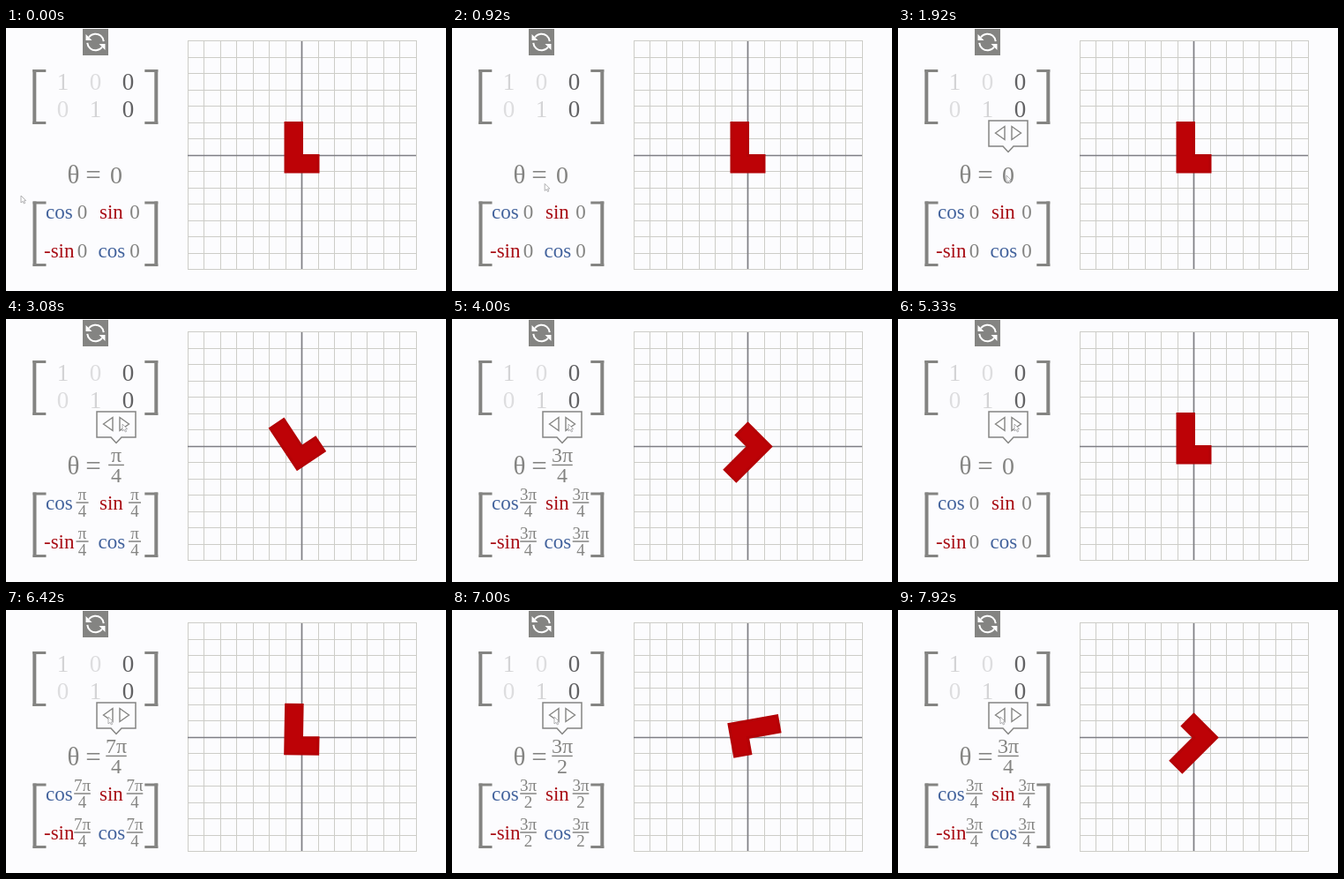
Write an HTML page with a canvas that moves like this. It is 499 px wide and 298 px high and loops after 8 s.

```html
<!DOCTYPE html>
<html lang="en">
<head>
<meta charset="utf-8">
<title>Rotation matrix</title>
<style>
html, body { margin: 0; width: 100%; height: 100%; overflow: hidden; background: #fcfcfe; }
canvas { display: block; }
</style>
</head>
<body>
<canvas id="stage" width="499" height="298"></canvas>
<script>
const ctx = document.getElementById('stage').getContext('2d');
const LOOP = 8000, TURN = 240, CELL = 18.5, CX = 335.5, CY = 144.5;
const PAPER = '#fcfcfe', GREY = '#848482', GRID = '#cdcdc8', AXIS = '#7e7e84';
const BLUE = '#42629c', CRIMSON = '#a80c14';
const SERIF = '"Liberation Serif", serif';

// Each click adds or removes an eighth of a turn.
const forward = [2920, 3270, 3620, 4090, 4335, 4580, 4825, 5070];
const backward = [6400, 6835, 7110, 7390, 7665];
const popupAt = 1670;
const cursorPath = [
  [250, 17, 190], [1000, 108, 176], [1300, 123, 167],
  [1960, 123, 167], [2420, 132, 119], [5400, 132, 119], [5750, 116, 121]
];

const clamp = v => Math.min(1, Math.max(0, v));
const smooth = v => v * v * (3 - 2 * v);

function line(points, color, width, close, fill) {
  ctx.beginPath();
  points.forEach(([x, y]) => ctx.lineTo(x, y));
  if (close) ctx.closePath();
  if (fill) { ctx.fillStyle = fill; ctx.fill(); }
  ctx.strokeStyle = color;
  ctx.lineWidth = width;
  ctx.stroke();
}

function text(str, x, y, size, color, align = 'center') {
  ctx.font = `${size}px ${SERIF}`;
  ctx.textAlign = align;
  ctx.fillStyle = color;
  ctx.fillText(str, x, y);
}

function brackets(left, right, top, bottom) {
  for (const [x, dir] of [[left, 1], [right, -1]]) {
    line([[x + 2 * dir, top], [x + 2 * dir, bottom]], GREY, 4);
    for (const y of [top + 1.5, bottom - 1.5]) line([[x, y], [x + 15 * dir, y]], GREY, 3);
  }
}

// Shows eighths * π/4 in lowest terms.
function angle(eighths, x, baseline, size, fracSize, color) {
  const common = eighths % 4 === 0 ? 4 : eighths % 2 === 0 ? 2 : 1;
  const n = eighths / common, d = 4 / common;
  const top = n === 0 ? '0' : (n > 1 ? n : '') + 'π';
  if (d === 1) return text(top, x, baseline, size, color);
  const bar = baseline - fracSize * 0.42;
  const half = fracSize * (n > 1 ? 0.49 : 0.37);
  text(top, x, bar - 3, fracSize, color);
  line([[x - half, bar], [x + half, bar]], color, 1.5);
  text(d, x, bar + fracSize * 0.67 + 3, fracSize, color);
}

function drawIcon() {
  ctx.fillStyle = GREY;
  ctx.fillRect(87, 1, 29, 30);
  ctx.save();
  ctx.translate(101.5, 16);
  ctx.scale(-1, 1);
  for (let i = 0; i < 2; i++) {
    ctx.beginPath();
    ctx.arc(0, 0, 9.3, Math.PI * 1.03, Math.PI * 1.8);
    ctx.strokeStyle = '#fff';
    ctx.lineWidth = 2;
    ctx.stroke();
    ctx.beginPath();
    ctx.moveTo(11, -9);
    ctx.lineTo(11, -2);
    ctx.lineTo(4, -2);
    ctx.fillStyle = '#fff';
    ctx.fill();
    ctx.rotate(Math.PI);
  }
  ctx.restore();
}

function drawGrid() {
  for (let i = 0; i <= 14; i++) {
    const x = Math.floor(206 + i * CELL) + 0.5, y = Math.floor(14.6 + i * CELL) + 0.5;
    line([[x, 14], [x, 274]], GRID, 1);
    line([[206, y], [465, y]], GRID, 1);
  }
  line([[CX, 15], [CX, 273]], AXIS, 1.7);
  line([[206, CY], [465, CY]], AXIS, 1.7);
}

function drawShape(turn) {
  const corners = [[-1, -2], [0, -2], [0, 0], [1, 0], [1, 1], [-1, 1]];
  ctx.save();
  ctx.translate(CX, CY);
  ctx.rotate(-turn * Math.PI / 4);
  line(corners.map(([x, y]) => [x * CELL, y * CELL]), '#b40206', 3, true, '#bd0206');
  ctx.restore();
}

function drawMatrices(eighths) {
  brackets(30.3, 172.3, 47, 109);
  ['100', '010'].forEach((row, r) => [...row].forEach((digit, c) =>
    text(digit, 64.5 + 37 * c, 70 + 31 * r, 27, c === 2 ? '#626264' : digit === '1' ? '#d4d4d6' : '#dddddf')));

  text('θ', 76.5, 176, 29, GREY);
  text('=', 99, 177, 31, GREY);
  angle(eighths, 125, 175.5, 28, 24, GREY);

  brackets(30.5, 172.3, 196.5, 270);
  const entries = [
    ['cos', 45, 216, BLUE], ['sin', 106, 216, CRIMSON],
    ['-sin', 43, 260, CRIMSON], ['cos', 104.5, 260, BLUE]
  ];
  entries.forEach(([name, x, y, color], i) => {
    text(name, x, y, 23, color, 'left');
    angle(eighths, i % 2 ? 146 : 86.5, y, 23, 19, GREY);
  });
}

function drawPopup() {
  line([[103, 105], [147, 105], [147, 134], [131, 134], [125, 140.5], [119, 134], [103, 134]],
    GREY, 1.5, true, PAPER);
  line([[110.5, 119], [121, 111.5], [121, 126.5]], GREY, 1.4, true, '#fff');
  line([[139.5, 119], [129, 111.5], [129, 126.5]], GREY, 1.4, true, '#fff');
}

function drawCursor(t) {
  let [, x, y] = cursorPath[0];
  for (let i = 1; i < cursorPath.length; i++) {
    const [t0, x0, y0] = cursorPath[i - 1], [t1, x1, y1] = cursorPath[i];
    if (t < t0) break;
    const p = smooth(clamp((t - t0) / (t1 - t0)));
    x = x0 + (x1 - x0) * p;
    y = y0 + (y1 - y0) * p;
  }
  const outline = [[0, 0], [0, 8], [2, 6.3], [3.4, 9], [4.6, 8.4], [3.4, 5.8], [5.6, 5.6]];
  line(outline.map(([dx, dy]) => [x + dx, y + dy]), '#a8a8aa', 0.9, true, '#fff');
}

function draw(t) {
  const clicks = times => times.filter(at => t >= at).length;
  const turned = times => times.reduce((sum, at) => sum + smooth(clamp((t - at) / TURN)), 0);
  ctx.fillStyle = PAPER;
  ctx.fillRect(0, 0, 499, 298);
  drawIcon();
  drawGrid();
  drawShape(turned(forward) - turned(backward));
  drawMatrices((clicks(forward) - clicks(backward)) % 8);
  if (t >= popupAt) drawPopup();
  drawCursor(t);
}

function tick() {
  draw(performance.now() % LOOP);
  requestAnimationFrame(tick);
}
tick();
</script>
</body>
</html>
```
